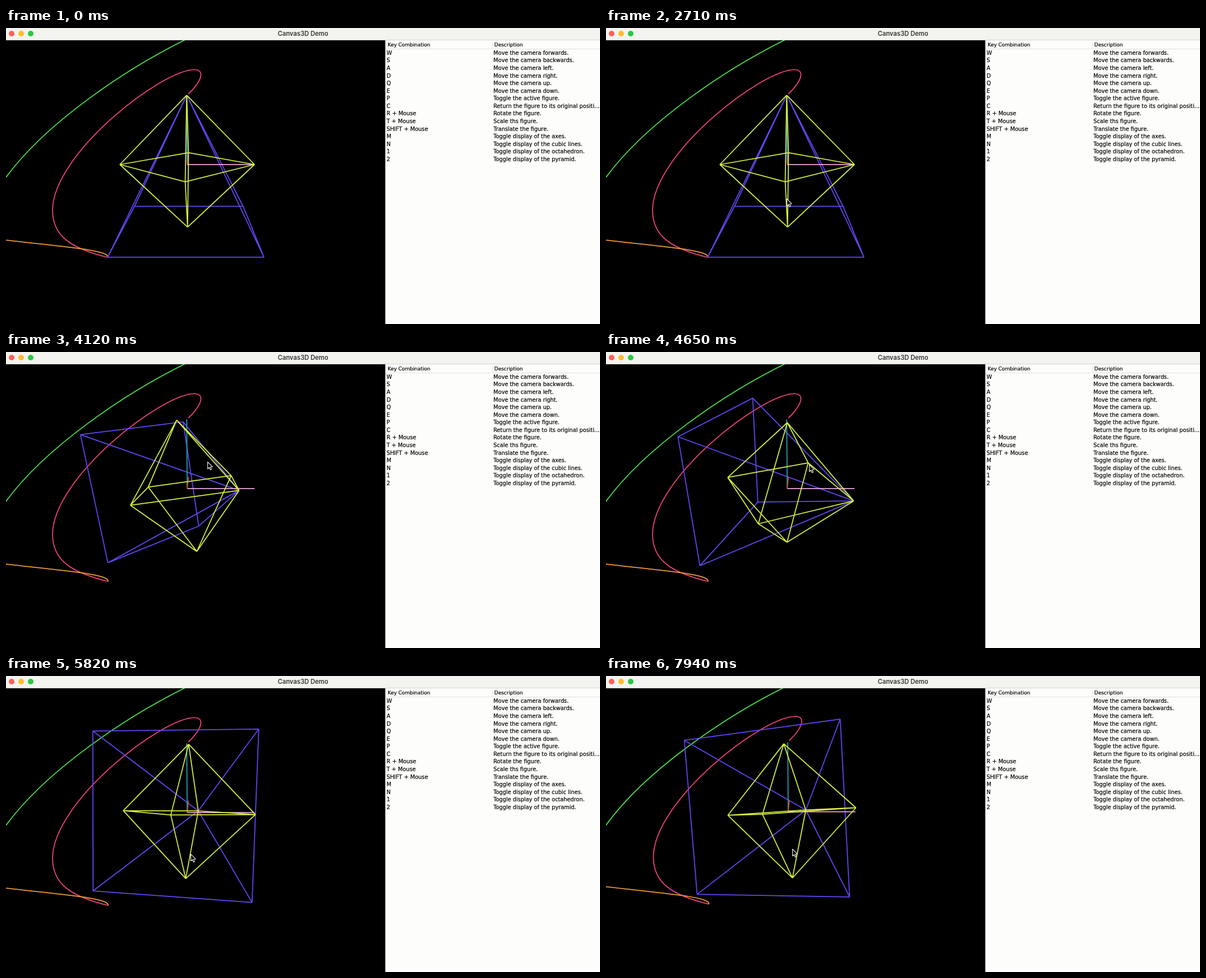
These frames come from a looping animation (1059 px wide and 529 px high, 8 s). An HTML page with a canvas:

```html
<!DOCTYPE html>
<html lang="en">
<head>
<meta charset="utf-8">
<title>Canvas3D Demo</title>
<style>
html, body { margin: 0; width: 100%; height: 100%; overflow: hidden; background: #fdfdfb; }
#stage { position: relative; width: 1059px; height: 529px; overflow: hidden; }
canvas { position: absolute; left: 0; top: 22px; background: #000; }
#bar { position: absolute; left: 0; top: 0; width: 1059px; height: 21px; background: #f3f3ef;
  border-bottom: 1px solid #d4d4d0; text-align: center;
  font: 600 11.2px/20px Inter, "Open Sans", sans-serif; color: #333; }
#bar i { position: absolute; top: 5px; width: 10px; height: 10px; border-radius: 50%; }
#panel { font: 9.77px/13.57px "DejaVu Sans", sans-serif; color: #000; -webkit-text-stroke: .2px #000; }
#panel span { position: absolute; white-space: pre; }
#panel .head { font-size: 8.95px; }
.rule { position: absolute; background: #e2e2e0; }
</style>
</head>
<body>
<div id="stage">
  <div id="bar">
    <i style="left:5px;background:#ff5f57"></i>
    <i style="left:22px;background:#febc2e"></i>
    <i style="left:39px;background:#28c840"></i>
    Canvas3D Demo
  </div>
  <canvas id="view" width="676" height="507"></canvas>
  <div class="rule" style="left:676px;top:22px;width:1px;height:507px;background:#c4c4c4"></div>
  <div class="rule" style="left:677px;top:37px;width:382px;height:1px"></div>
  <div class="rule" style="left:867px;top:24px;width:1px;height:13px"></div>
  <div id="panel"></div>
</div>
<script>
const LOOP = 8000;
const ctx = document.getElementById('view').getContext('2d');
const panel = document.getElementById('panel');

// ---- key table ----
const rows = [
  ['W', 'Move the camera forwards.'],
  ['S', 'Move the camera backwards.'],
  ['A', 'Move the camera left.'],
  ['D', 'Move the camera right.'],
  ['Q', 'Move the camera up.'],
  ['E', 'Move the camera down.'],
  ['P', 'Toggle the active figure.'],
  ['C', 'Return the figure to its original positi...'],
  ['R + Mouse', 'Rotate the figure.'],
  ['T + Mouse', 'Scale ths figure.'],
  ['SHIFT + Mouse', 'Translate the figure.'],
  ['M', 'Toggle display of the axes.'],
  ['N', 'Toggle display of the cubic lines.'],
  ['1', 'Toggle display of the octahedron.'],
  ['2', 'Toggle display of the pyramid.']
];

function label(text, x, y, cls = '') {
  const el = document.createElement('span');
  el.textContent = text;
  el.style.left = x + 'px';
  el.style.top = y + 'px';
  el.className = cls;
  panel.append(el);
}
label('Key Combination', 680.5, 24, 'head');
label('Description', 870.5, 24, 'head');
rows.forEach(([key, text], i) => {
  const y = 37.8 + i * 13.57;
  label(key, 678.5, y);
  label(text, 869, y);
});

// ---- motion ----
// Time, then yaw, pitch and roll in degrees, then the pointer.
const drag = [
  [2850, 0, 0, 0, 322, 305],
  [4120, 43.7, 82.5, 4.3, 359, 196],
  [5180, 94.8, 110.4, 25.6, 365, 206],
  [5820, 170, 100.2, -.4, 329, 318],
  [6300, 164, 99.7, -6.6, 332, 309]
];

function dragAt(t) {
  const next = drag.findIndex(k => k[0] > t);
  if (next === 0) return drag[0].slice(1);
  if (next < 0) return drag[drag.length - 1].slice(1);
  const p = drag[next - 1], q = drag[next];
  const u = (t - p[0]) / (q[0] - p[0]);
  return p.map((v, i) => v + (q[i] - v) * u).slice(1);
}

function rise(t, from, to) {
  const u = Math.min(1, Math.max(0, (t - from) / (to - from)));
  return u * u * (3 - 2 * u);
}

// ---- 3D ----
const FOCAL = 612, DEPTH = 5.1, TILT = 15;
let eyeX, eyeY;

function turn(a, b, deg) {
  const r = deg * Math.PI / 180, c = Math.cos(r), s = Math.sin(r);
  return [a * c - b * s, a * s + b * c];
}

function project([x, y, z], [yaw, pitch, roll], scale) {
  [y, z] = turn(y, z, pitch);
  [x, y] = turn(x, y, roll);
  [z, x] = turn(z, x, yaw);
  [y, z] = turn(y, z, TILT);
  const s = FOCAL / (DEPTH - z * scale);
  return [338 + s * (x * scale + eyeX), 275.5 - s * (y * scale + eyeY)];
}

function wire(color, { pts, edges }, angles = [0, 0, 0], scale = 1) {
  const flat = pts.map(p => project(p, angles, scale));
  ctx.strokeStyle = color;
  ctx.beginPath();
  for (const [i, j] of edges) {
    ctx.moveTo(...flat[i]);
    ctx.lineTo(...flat[j]);
  }
  ctx.stroke();
}

const octahedron = { pts: [], edges: [] };
for (const sign of [1, -1])
  for (let axis = 0; axis < 3; axis++)
    octahedron.pts.push([0, 1, 2].map(i => i === axis ? sign : 0));
for (let i = 0; i < 6; i++)
  for (let j = i + 1; j < 6; j++)
    if (j !== i + 3) octahedron.edges.push([i, j]);

const pyramid = { pts: [[0, 1, 0]], edges: [] };
for (let i = 0; i < 4; i++) {
  const [x, z] = turn(1, 1, i * 90);
  pyramid.pts.push([x, -1, z]);
  pyramid.edges.push([0, i + 1], [i + 1, (i + 1) % 4 + 1]);
}

const axis = (x, y, z) => ({ pts: [[0, 0, 0], [x, y, z]], edges: [[0, 1]] });
const axes = [
  ['#f2a9e4', axis(1, 0, 0)],
  ['#2b9fb8', axis(0, 1, 0)],
  ['#d9472f', axis(0, 0, -1)]
];

// ---- cubic lines ----
const curves = [
  ['#4be34a', 'M336 13C220 68 62 173 -10 281'],
  ['#f0437c', 'M325 118C343 101 358 77 338 74.5C280 72 83 225 83 326C83 372 116 394 182 410'],
  ['#f39a35', 'M-10 378C90 390 185 396 182 410']
].map(([color, d]) => [color, new Path2D(d)]);

const arrow = new Path2D('M.5 .5v12.2l2.8-2.4l2 4.4l2-.9l-1.9-4.3l3.7-.3z');

function drawPointer(x, y) {
  ctx.save();
  ctx.translate(x, y);
  ctx.fillStyle = '#000';
  ctx.fill(arrow);
  ctx.lineWidth = 1.1;
  ctx.strokeStyle = '#f4f4f4';
  ctx.stroke(arrow);
  ctx.restore();
}

function draw(t) {
  const [yaw, pitch, roll, px, py] = dragAt(t);
  const angles = [yaw, pitch, roll];
  const pull = rise(t, 6480, 7090) - rise(t, 7090, 7860);
  const nudge = rise(t, 6000, 6300);
  const scale = 1 + .494 * pull;
  eyeX = -.125 + .015 * nudge;
  eyeY = .2625 + .0115 * nudge;

  ctx.setTransform(1, 0, 0, 1, 0, -22);
  ctx.fillStyle = '#000';
  ctx.fillRect(0, 22, 676, 507);
  ctx.lineWidth = 1.75;
  ctx.lineJoin = 'round';

  ctx.save();
  ctx.translate(1.5 * nudge, -2.3 * nudge);
  for (const [color, path] of curves) {
    ctx.strokeStyle = color;
    ctx.stroke(path);
  }
  ctx.restore();

  wire('#6247f3', pyramid, angles, scale);
  for (const [color, line] of axes) wire(color, line);
  wire('#d9f03f', octahedron, angles, scale);
  if (t >= 2120) drawPointer(px + 158 * pull, py + 21.8 * pull);
}

const start = performance.now();
function tick() {
  draw((performance.now() - start) % LOOP);
  requestAnimationFrame(tick);
}
tick();
</script>
</body>
</html>
```
